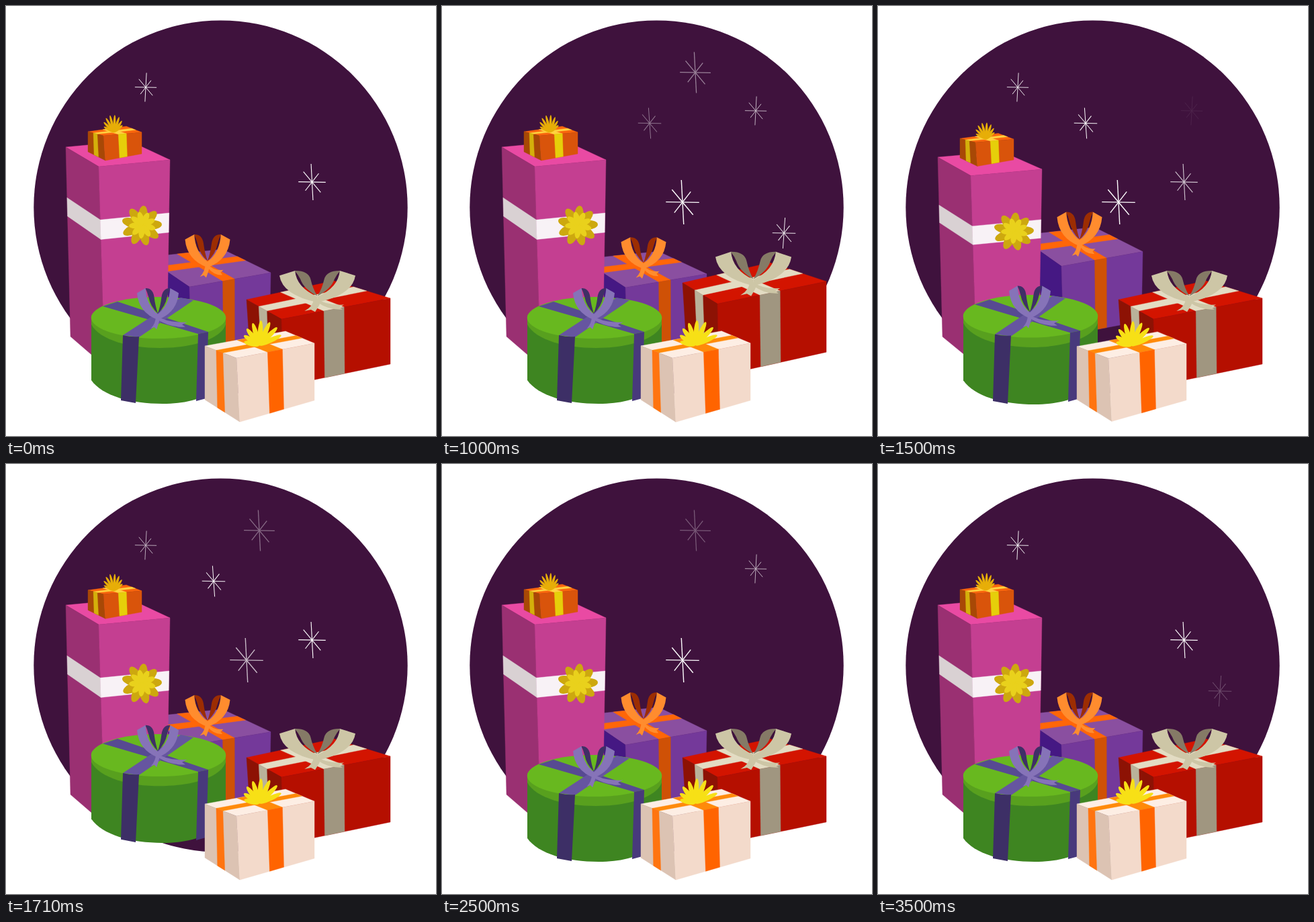
Write an HTML page that moves like this. It is 640x640 px and loops after 3570 ms.

```html
<!DOCTYPE html>
<html lang="en">
<head>
<meta charset="utf-8">
<title>Hopping presents</title>
<style>
html, body { margin: 0; width: 100%; height: 100%; overflow: hidden; background: #fff; }
svg { display: block; width: 100%; height: 100%; }
</style>
</head>
<body>
<svg viewBox="0 0 640 640">
  <defs>
    <g id="loop">
      <path fill="var(--dark)" d="M-.58 -1Q-.24 -1 -.18 -.7Q-.12 -.35 0 -.1Q-.36 -.35 -.45 -.7Q-.5 -.85 -.6 -1Z"/>
      <path fill="var(--light)" d="M0 .12Q-.92 -.14 -1 -.83L-.59 -1Q-.55 -.4 0 -.08Z"/>
    </g>
    <path id="leftTail" fill="var(--light)" d="M-.1 0Q-.1 .25 -.34 .43L-.17 .38L-.06 .46Q.05 .25 .12 0Z"/>
    <path id="rightTail" fill="var(--light)" d="M0 0Q.25 .24 .7 .2L.58 .29L.66 .37Q.3 .4 0 .12Z"/>
  </defs>

  <circle cx="319.5" cy="299.7" r="278.2" fill="#3f123d"/>
  <g id="stars" stroke="#fff"></g>
  <g id="purple"></g>
  <g id="pink"></g>
  <g id="orange"></g>
  <g id="red"></g>
  <g id="green">
    <path fill="#3e8521" d="M127 464V557C143 580 186 592 233 592C275 592 309 581 327 556V464Z"/>
    <path fill="#58a01e" d="M127 460V474C139 497 184 509 229 509C276 509 320 496 327 474V463Z"/>
    <ellipse fill="#68b81f" cx="227" cy="464" rx="100.3" ry="31"/>
    <path fill="#574a92" d="M144 447L166 440L301 485L286 488Z"/>
    <path fill="#6655a0" d="M260 434L279 438L198 493L174 490Z"/>
    <path fill="#3d2f66" d="M174 490Q186 493 198 492L193 591L171 587Z"/>
    <path fill="#48397c" d="M286 488L301 485L298 584L283 588Z"/>
  </g>
  <g id="cream"></g>
</svg>
<script>
const LOOP = 3570, RATE = 0.014, FADE = 400;
const $ = id => document.getElementById(id);

function add(parent, tag, attrs) {
  const el = document.createElementNS("http://www.w3.org/2000/svg", tag);
  for (const k in attrs) el.setAttribute(k, attrs[k]);
  return parent.appendChild(el);
}

// ---- shapes ----

const mix = (p, q, u) => [p[0] + (q[0] - p[0]) * u, p[1] + (q[1] - p[1]) * u];

function poly(id, fill, ...points) {
  add($(id), "polygon", { points: points.join(" "), fill, stroke: fill, "stroke-width": 0.4 });
}

// part of a face between two fractions of its edges a-b and c-d
function band(id, fill, [from, to], a, b, c, d) {
  poly(id, fill, mix(a, b, from), mix(a, b, to), mix(c, d, to), mix(c, d, from));
}

// corners: left, back, right, front; feet: left, right, front
function box(id, corners, feet, paint) {
  const [left, back, right, front] = corners;
  const [leftFoot, rightFoot, frontFoot] = feet;
  poly(id, paint.top, left, back, right, front);
  poly(id, paint.left, left, front, frontFoot, leftFoot);
  poly(id, paint.front, front, right, rightFoot, frontFoot);
  return {
    ribbon(across, along, paint) {
      band(id, paint.top, across, front, right, left, back);
      band(id, paint.top, along, left, front, back, right);
      band(id, paint.left, along, left, front, leftFoot, frontFoot);
      band(id, paint.front, across, front, right, frontFoot, rightFoot);
    },
    belt(height, paint) {
      band(id, paint.left, height, left, leftFoot, front, frontFoot);
      band(id, paint.front, height, front, frontFoot, right, rightFoot);
    }
  };
}

function bow(id, x, y, w, h, light, dark, tail = w) {
  const g = add($(id), "g", { style: `--light:${light};--dark:${dark}`, transform: `translate(${x} ${y})` });
  add(g, "use", { href: "#loop", transform: `scale(${w} ${h})` });
  add(g, "use", { href: "#loop", transform: `scale(${-w} ${h})` });
  add(g, "use", { href: "#leftTail", transform: `scale(${w} ${h})` });
  add(g, "use", { href: "#rightTail", transform: `scale(${tail} ${h})` });
}

function petals(id, fill, x, y, count, from, step, width, length) {
  for (let i = 0; i < count; i++) {
    const angle = from + i * step, r = length(angle) / 2;
    add($(id), "ellipse", { cx: r, rx: r, ry: width / 2, fill, transform: `translate(${x} ${y}) rotate(${angle})` });
  }
}

// petals are longest towards the angle `peak`
const leaning = (size, peak, drop) => angle => size * (1 - drop + drop * Math.cos((angle - peak) * Math.PI / 180));

box("purple", [[208, 374], [322, 362], [394, 397], [273, 418]], [[211, 474], [392, 497], [276, 518]],
  { top: "#8a4fa0", left: "#451883", front: "#74399a" })
  .ribbon([.41, .555], [.31, .48], { top: "#ff6608", left: "#cf5106", front: "#cf5106" });
bow("purple", 300, 384, 33.5, 44, "#ff8c2e", "#9c2d02");

box("pink", [[89, 210], [184, 201], [244, 229], [138, 239]], [[96, 492], [239, 525], [147, 536]],
  { top: "#e94aa3", left: "#9a3072", front: "#c43f91" })
  .belt([.267, .365], { left: "#d9d1d3", front: "#f8f2f6" });
petals("pink", "#cda80f", 202, 327, 9, -84, 40, 14, () => 30);
petals("pink", "#e9d11c", 203, 326, 9, -64, 40, 9, () => 20);

box("orange", [[122, 187], [179, 179], [202, 188], [145, 193]], [[122, 217], [202, 220], [148, 230]],
  { top: "#f9650d", left: "#a84806", front: "#d9540b" })
  .ribbon([.39, .6], [.35, .6], { top: "#ffd23f", left: "#d4b00b", front: "#e6cf0a" });
petals("orange", "#e7ae08", 161, 188, 8, -152, 16, 3.8, leaning(26, -98, .8));

box("red", [[358, 437], [488, 409], [572, 435], [410, 466]], [[364, 526], [572, 533], [412, 566]],
  { top: "#d31400", left: "#8d1204", front: "#b50f00" })
  .ribbon([.39, .575], [.35, .58], { top: "#e3dcc3", left: "#b9b29a", front: "#a09680" });
bow("red", 463.5, 436, 56.5, 42, "#cdc6a6", "#857a66");

bow("green", 226, 462, 31, 42, "#8673b8", "#3f2f66", 62);

box("cream", [[296, 506], [416, 484], [459, 502], [343, 524]], [[296, 586], [459, 587], [348, 619]],
  { top: "#fdeee4", left: "#dcc3b3", front: "#f3dacb" })
  .ribbon([.4, .59], [.36, .57], { top: "#ff8a0a", left: "#ff7410", front: "#ff6400" });
petals("cream", "#f7e016", 377, 505, 8, -168, 20.5, 7.5, leaning(38, -60, .3));

// ---- stars: centre, radius, tilt and the spans of full light ----

function star(x, y, r, tilt, ...spans) {
  const g = add($("stars"), "g", { transform: `translate(${x} ${y})`, "stroke-width": r * 0.042 });
  const rays = [[90 + tilt, 1], [1, .75], [50, .74], [-52, .6]];
  for (const [angle, size] of rays) {
    add(g, "line", { x1: -r * size, x2: r * size, transform: `rotate(${angle})` });
  }
  return { g, spans };
}

const stars = [
  star(208, 121, 21.5, 3, [1530, 1590], [-170, 110]),
  star(377, 99, 30.5, -3, [690, 790], [1960, 2220], [3030, 3040]),
  star(455.5, 262, 27, -3, [-70, 430], [1600, 2090]),
  star(358, 292, 33, -3, [990, 1600], [2430, 2600]),
  star(509, 338, 23, 4, [1030, 1050], [3000, 3200]),
  star(309, 174.5, 23, -4, [1230, 2100]),
  star(467, 156, 21.5, 3, [1110, 1130], [2620, 2700])
];

function glow(t, [on, off]) {
  if (t > off + FADE) t -= LOOP;
  const away = Math.max(on - t, t - off, 0);
  return Math.max(0, 1 - away / FADE);
}

// ---- motion ----

const phase = (t, a, b) => Math.min(1, Math.max(0, (t - a) / (b - a)));
const arc = p => Math.sin(Math.PI * p);
const bump = (t, a, b) => arc(phase(t, a, b)) ** 2;

// crouch, stretch and leap, then a soft landing
const hop = t => ({
  scale: 1 - .065 * bump(t, 0, 340) + .075 * bump(t, 340, 680) - .05 * bump(t, 650, 900),
  lift: -30 * arc(phase(t, 460, 735))
});

// dips with the tower, then is thrown higher and falls back
const toss = t => ({
  scale: 1 - .06 * bump(t, 0, 400) + .3 * bump(t, 410, 820) + .33 * bump(t, 870, 1100)
    - .08 * bump(t, 1120, 1340) + .03 * bump(t, 1340, 1480),
  lift: 11 * bump(t, 0, 350) - 95 * arc(phase(t, 370, 1120) ** 1.5)
});

const gifts = [
  { id: "red", start: 480, base: 517, move: hop },
  { id: "cream", start: 640, base: 560, move: hop },
  { id: "purple", start: 900, base: 440, move: hop },
  { id: "green", start: 1092, base: 552, move: hop },
  { id: "pink", start: 1380, base: 498, move: hop },
  { id: "orange", start: 1380, base: 230, move: toss }
];

function draw(now) {
  // the motion is held at 14 steps per second
  const t = Math.min(49, Math.floor((now % LOOP + 5) * RATE)) / RATE;
  for (const { g, spans } of stars) {
    g.setAttribute("opacity", Math.max(...spans.map(span => glow(t, span))));
  }
  for (const { id, start, base, move } of gifts) {
    const { scale, lift } = move(t - start);
    $(id).setAttribute("transform", `matrix(1 0 0 ${scale} 0 ${base * (1 - scale) + lift})`);
  }
}

let begin;
function tick(now) {
  if (begin === undefined) begin = now;
  draw(now - begin);
  requestAnimationFrame(tick);
}
draw(0);
requestAnimationFrame(tick);
</script>
</body>
</html>
```
